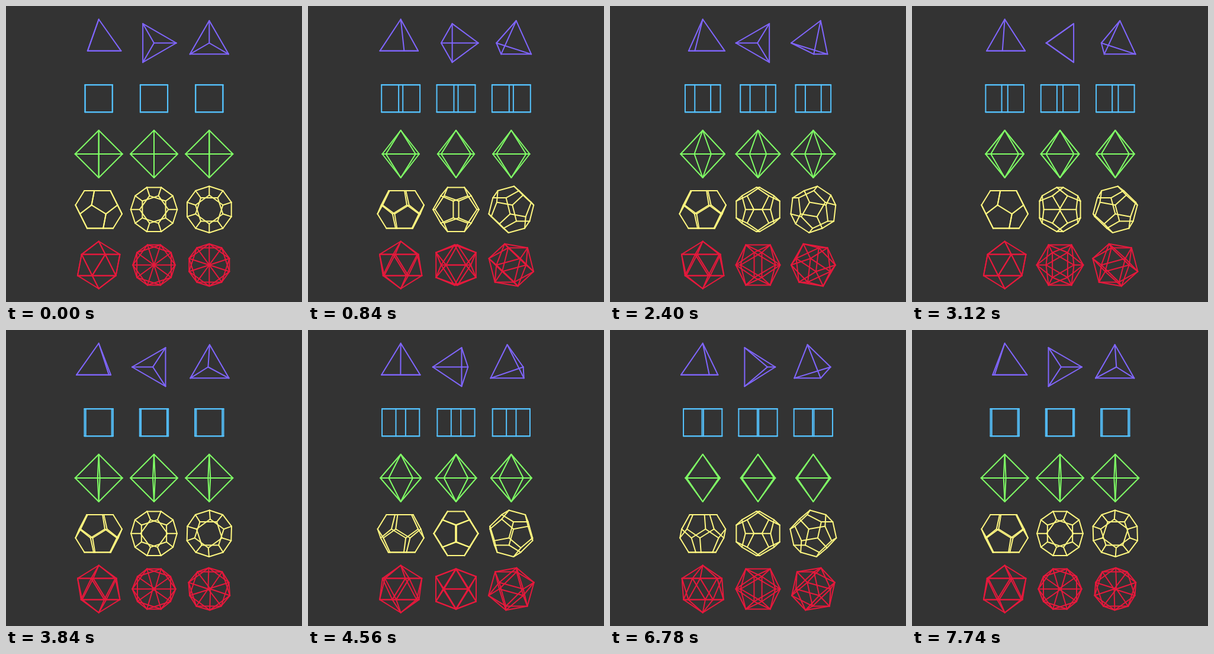
Animation, 500 px wide and 500 px high, one loop 7.8 s. Source, as an HTML page with a canvas:

```html
<!DOCTYPE html>
<html lang="en">
<head>
<meta charset="utf-8">
<title>Rotating solids</title>
<style>
html, body { margin: 0; width: 100%; height: 100%; overflow: hidden; background: #333; }
canvas { display: block; }
</style>
</head>
<body>
<canvas id="stage" width="500" height="500"></canvas>
<script>
const ctx = document.getElementById('stage').getContext('2d');
const LOOP = 7800, STEP = 60, R = 40;
const COLS = [156.67, 250, 343.33];

// n points on a horizontal circle of the sphere of radius R
const ring = (n, z, start) => Array.from({ length: n }, (_, k) => {
  const r = Math.sqrt(R * R - z * z), a = start + k * 2 * Math.PI / n;
  return [r * Math.cos(a), r * Math.sin(a), z];
});

// An edge joins every pair of vertices at the smallest distance
function solid(color, points) {
  const pairs = [];
  points.forEach((p, i) => points.slice(i + 1).forEach(q => {
    pairs.push({ p, q, d: Math.hypot(p[0] - q[0], p[1] - q[1], p[2] - q[2]) });
  }));
  const side = Math.min(...pairs.map(e => e.d));
  return { color, edges: pairs.filter(e => e.d < side * 1.01) };
}

const PI = Math.PI;
const north = [0, 0, R], south = [0, 0, -R];
const cubeZ = R / Math.sqrt(3), icoZ = R / Math.sqrt(5);
const capZ = R * 0.79465, midZ = R * 0.18759;

const solids = [
  solid('#8066ff', [north, ...ring(3, -R / 3, 0)]),
  solid('#55c3ff', [...ring(4, cubeZ, PI / 4), ...ring(4, -cubeZ, PI / 4)]),
  solid('#80ff66', [north, south, ...ring(4, 0, 0)]),
  solid('#fff780', [
    ...ring(5, capZ, PI), ...ring(5, midZ, PI),
    ...ring(5, -midZ, 0), ...ring(5, -capZ, 0)
  ]),
  solid('#e6193c', [north, south, ...ring(5, icoZ, 0), ...ring(5, -icoZ, PI)])
];

// Turn about z, y and x in turn; each axis stands upright on screen
const views = [
  ([x, y, z], c, s) => [x * c - y * s, z],
  ([x, y, z], c, s) => [x * c - z * s, y],
  ([x, y, z], c, s) => [y * c - z * s, x]
];

function draw(time) {
  const angle = Math.floor(time % LOOP / STEP) * STEP / LOOP * 2 * PI;
  const c = Math.cos(angle), s = Math.sin(angle);
  ctx.fillStyle = '#333';
  ctx.fillRect(0, 0, 500, 500);
  ctx.lineWidth = 2;
  ctx.lineCap = 'round';
  solids.forEach(({ color, edges }, row) => {
    const cy = 62.5 + row * 93.75;
    ctx.strokeStyle = color;
    views.forEach((view, col) => {
      for (const { p, q } of edges) {
        const [x1, y1] = view(p, c, s), [x2, y2] = view(q, c, s);
        ctx.beginPath();
        ctx.moveTo(COLS[col] + x1, cy - y1);
        ctx.lineTo(COLS[col] + x2, cy - y2);
        ctx.stroke();
      }
    });
  });
}

function tick() {
  draw(performance.now());
  requestAnimationFrame(tick);
}
tick();
</script>
</body>
</html>
```
